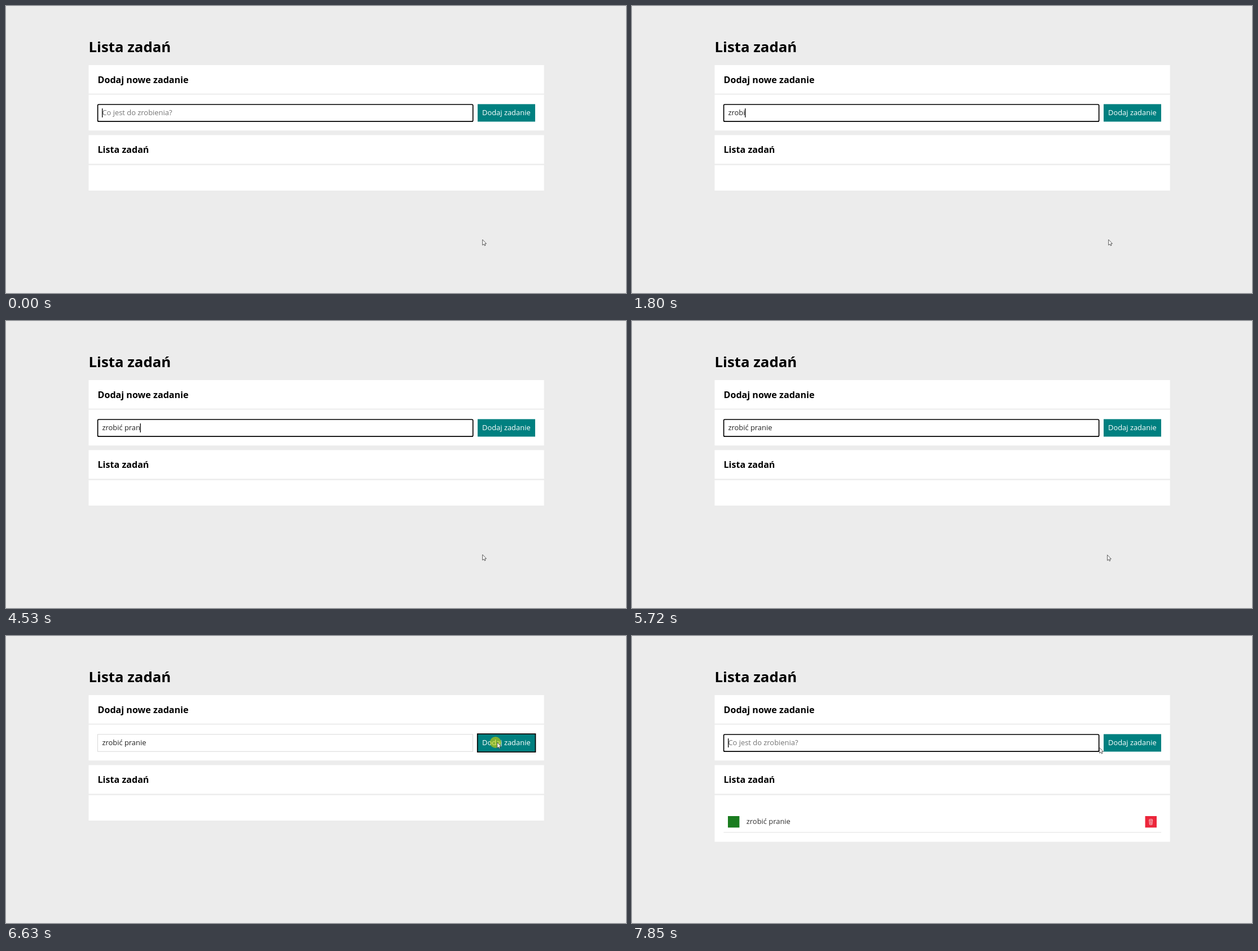
An HTML page that plays this animation: 1099x510 px, repeating every 8000 ms.

```html
<!DOCTYPE html>
<html lang="pl">
<head>
<meta charset="utf-8">
<title>Lista zadań</title>
<style>
  html, body { margin: 0; width: 100%; height: 100%; overflow: hidden; background: #ececec; }
  svg { display: block; width: 1099px; height: 510px; }
  text { font: 12.91px "Open Sans", "Noto Sans", sans-serif; fill: #222; white-space: pre; }
  .h1, .h2 { font-weight: 700; fill: #000; }
  .h1 { font-size: 25.8px; }
  .h2 { font-size: 16.1px; }
  .panel { fill: #fff; }
  .ring { fill: none; stroke: #000; stroke-width: 1.7; }
</style>
</head>
<body>
<svg viewBox="0 0 1099 510">
  <text class="h1" x="146.5" y="82.3">Lista zadań</text>

  <g class="panel">
    <rect x="146.5" y="105" width="807.2" height="50.6"/>
    <rect x="146.5" y="157.6" width="807.2" height="63.6"/>
    <rect x="146.5" y="229.4" width="807.2" height="51"/>
    <rect id="list" x="146.5" y="282.8" width="807.2" height="45.2"/>
  </g>
  <text class="h2" x="162.5" y="136.6">Dodaj nowe zadanie</text>
  <text class="h2" x="162.5" y="261">Lista zadań</text>

  <rect x="162.5" y="174.8" width="665" height="30.4" fill="#fff" stroke="#d8d8d8"/>
  <rect id="inputRing" class="ring" x="162.6" y="175" width="665.1" height="30.2" rx="2"/>
  <text id="hint" x="170.4" y="194.4" style="fill:#757575">Co jest do zrobienia?</text>
  <text id="typed" x="170.4" y="194.4"></text>
  <rect id="caret" y="182" width="1.3" height="16"/>

  <rect x="836" y="174.4" width="102" height="31.1" fill="#008080"/>
  <rect id="buttonRing" class="ring" x="835.7" y="174" width="102.8" height="32.1"/>
  <text x="844" y="194.4" style="fill:#fff">Dodaj zadanie</text>

  <g id="item">
    <rect x="170" y="320" width="20.4" height="20.4" fill="#1a7c1f"/>
    <text x="202.8" y="334.4" style="fill:#333">zrobić pranie</text>
    <rect x="909.6" y="320" width="20.4" height="20.4" fill="#ec263b"/>
    <g fill="none" stroke="#fff" stroke-width=".8" opacity=".85">
      <ellipse cx="919.7" cy="326.5" rx="3.1" ry="1"/>
      <path d="M916.7 327l.7 8q2.3 1 4.6 0l.7-8M918.7 328.3l.2 6M920.7 328.3l-.2 6"/>
    </g>
    <rect x="162.5" y="348.2" width="775.5" height="1.6" fill="#ececec"/>
  </g>

  <circle id="click" cx="867.6" cy="189" r="10" fill="#d6d400" opacity=".6"/>
  <path id="pointer" d="M.5 .5V10.4L2.8 8.4 4.2 11.4 5.8 10.7 4.5 7.7H7.3Z"
        fill="#fff" stroke="#333" stroke-width=".8" stroke-linejoin="round"/>
</svg>
<script>
const $ = id => document.getElementById(id);
const TASK = 'zrobić pranie';
const LOOP = 8000, FOCUS_BUTTON = 6630, SUBMIT = 6950;

// When each letter of the task appears
const keys = [620, 900, 1170, 1500, 1800, 2700, 3320, 3620, 3910, 4210, 4530, 4840, 5120];
// Caret: hidden and shown in turn
const blinks = [310, 620, 2400, 2700, 5720, 6340, FOCUS_BUTTON, SUBMIT, 7540, 7850];
// Pointer: time, x, y
const stops = [
  [0, 844.2, 414.6], [5720, 842.1, 415.2], [6020, 883, 366.2],
  [6340, 880, 249.5], [FOCUS_BUTTON, 870.3, 188.8], [7540, 828.2, 197.8]
];

const passed = (times, t) => times.filter(at => at <= t).length;
const show = (id, on) => $(id).style.display = on ? '' : 'none';

function draw() {
  const t = performance.now() % LOOP;
  const done = t >= SUBMIT;
  const pressed = t >= FOCUS_BUTTON && !done;
  const count = done ? 0 : passed(keys, t);

  $('typed').textContent = TASK.slice(0, count);
  const width = count ? $('typed').getComputedTextLength() : 0;
  $('caret').setAttribute('x', 170.1 + width);
  $('list').setAttribute('height', done ? 82.9 : 45.2);

  show('hint', !count);
  show('caret', passed(blinks, t) % 2 === 0);
  show('inputRing', !pressed);
  show('buttonRing', pressed);
  show('click', pressed);
  show('item', done);

  const [, x, y] = stops.filter(s => s[0] <= t).pop();
  $('pointer').setAttribute('transform', `translate(${x} ${y})`);
  requestAnimationFrame(draw);
}
draw();
</script>
</body>
</html>
```
